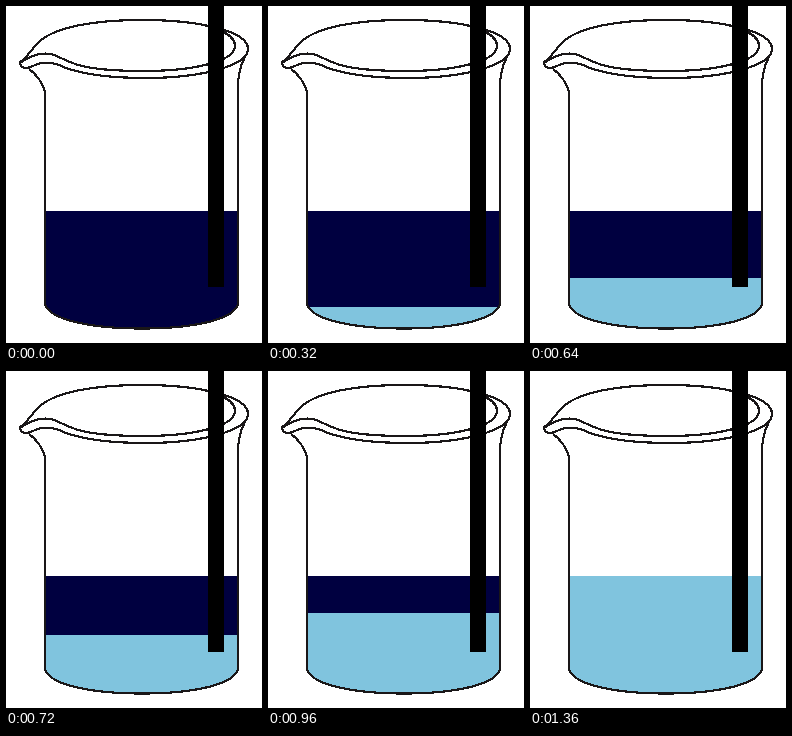
An HTML page for the animation above (1.44 s loop, 256x337 px).

```html
<!DOCTYPE html>
<html lang="en">
<head>
<meta charset="utf-8">
<title>Beaker</title>
<style>
  html, body { margin: 0; width: 100%; height: 100%; overflow: hidden; background: #fff; }
  svg { display: block; width: 256px; height: 337px; }
  .glass { fill: none; stroke: #1a1718; stroke-width: 2.2; stroke-linejoin: round; }
</style>
</head>
<body>
<svg viewBox="0 0 256 337" shape-rendering="crispEdges">
  <defs>
    <clipPath id="inside">
      <path d="M39 205H232V298C228 314 186 322.5 136 322.5S43 314 39 298Z"/>
    </clipPath>
  </defs>
  <g clip-path="url(#inside)">
    <rect x="39" y="205" width="193" height="120" fill="#000040"/>
    <rect id="light" x="39" y="337" width="193" height="120" fill="#80c4de"/>
  </g>
  <g class="glass">
    <!-- walls and base -->
    <path d="M23 63C29 67 39 79 39 88V298C43 314 86 322.5 136 322.5S228 314 232 298V82C232 68 235 58 239 51"/>
    <!-- outer rim and spout -->
    <path d="M14 56C20 53 24 45 31 38C46 21 88 14 136 14C194 14 242 25 242 43C242 60 194 72 140 72C108 72 80 69 60 62C46 55 36 55 27 60C21 63 14 63 14 56Z"/>
    <!-- inner rim -->
    <path d="M14 57C22 51 32 46 45 48C53 50 60 56 76 60C93 64 114 65 138 65C189 65 229 55 229 40C229 30 217 24 198 19"/>
  </g>
  <rect x="202" y="0" width="16" height="281"/>
</svg>
<script>
  const STEP = 80, STEPS = 18;
  const TOP = 205, RISE = 7.4;
  const light = document.getElementById('light');

  // The light layer climbs evenly and meets the surface on the last step.
  function draw() {
    const step = Math.floor(performance.now() / STEP) % STEPS;
    light.setAttribute('y', Math.round(TOP + (STEPS - 1 - step) * RISE));
    requestAnimationFrame(draw);
  }
  draw();
</script>
</body>
</html>
```
